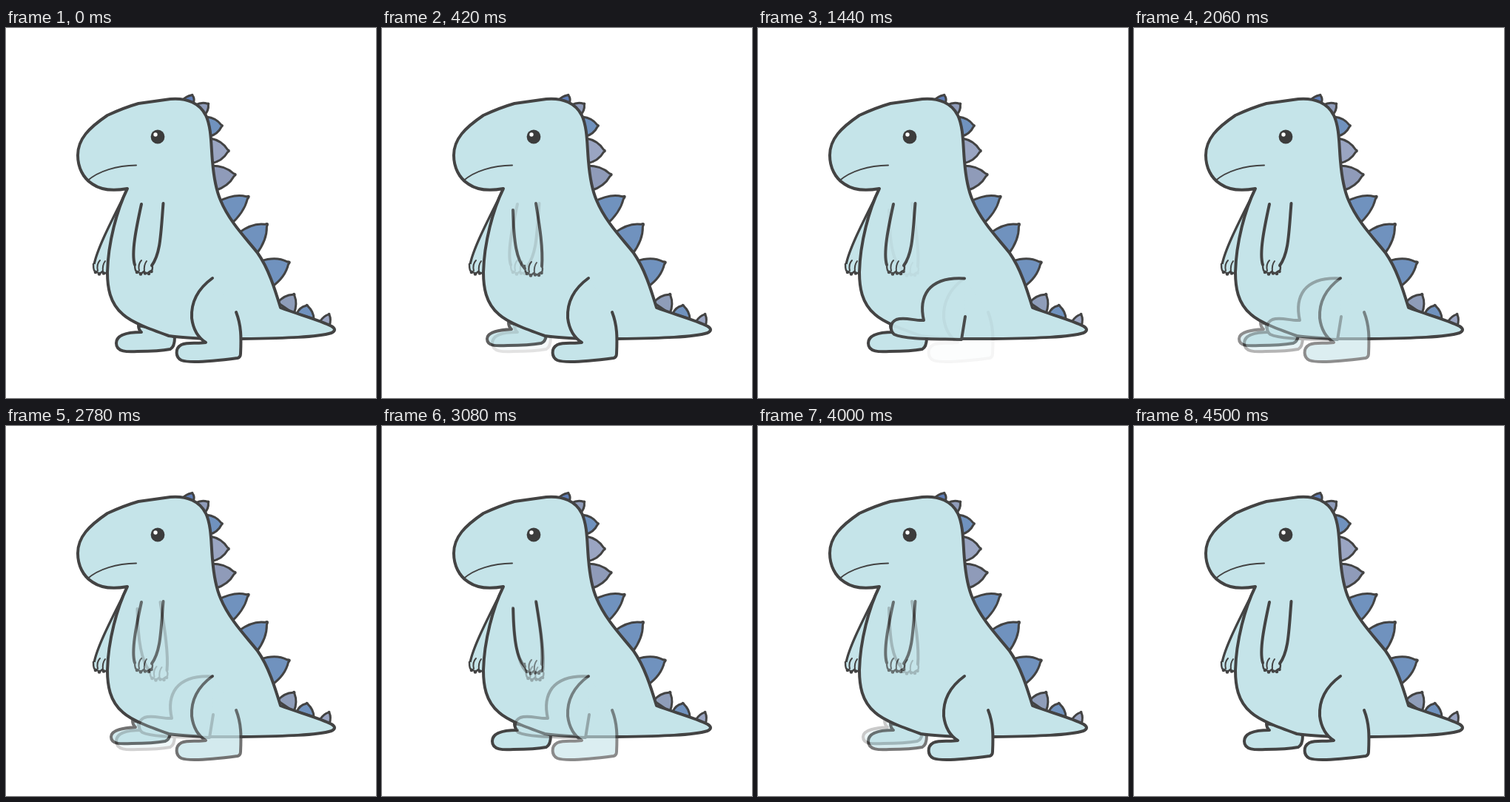
Animation of 500 by 500 pixels, one loop 4.62 s. Source, as an HTML page:

```html
<!DOCTYPE html>
<html>
<head>
<meta charset="utf-8">
<style>
  html, body { margin: 0; width: 100%; height: 100%; overflow: hidden; background: #fff; }
  svg { display: block; width: 100%; height: 100%; }
</style>
</head>
<body>
<svg id="stage" viewBox="0 0 500 500"><g id="from"></g><g id="to"></g></svg>
<script>
const LOOP = 4620, INK = '#434343', SKIN = '#c5e4e9';

const path = (d, width = 4, fill = 'none') =>
  `<path d="${d}" fill="${fill}" stroke="${INK}" stroke-width="${width}" stroke-linecap="round" stroke-linejoin="round"/>`;
const dot = (x, y, r, fill) => `<circle cx="${x}" cy="${y}" r="${r}" fill="${fill}"/>`;

// A back plate: two bulging sides that meet in a rounded tip
function spike([ax, ay, tx, ty, bx, by, fill]) {
  const cx = (ax + tx + bx) / 3, cy = (ay + ty + by) / 3;
  const bulge = (x, y) => {
    const mx = (x + tx) / 2, my = (y + ty) / 2;
    return `${mx + (mx - cx) * .65},${my + (my - cy) * .65}`;
  };
  const nearTip = (x, y) => `${tx + (x - tx) * .1},${ty + (y - ty) * .1}`;
  const peak = `${tx + (tx - cx) * .08},${ty + (ty - cy) * .08}`;
  return path(`M${ax},${ay}Q${bulge(ax, ay)} ${nearTip(ax, ay)}Q${peak} ${nearTip(bx, by)}Q${bulge(bx, by)} ${bx},${by}Z`, 3, fill);
}

function hand(dx, dy) {
  const claws = [[177, 330], [182, 332.5], [188, 331.5], [193, 332], [196.5, 329]];
  return `<g transform="translate(${dx} ${dy})">` +
    path('M174,319C174,326 175,330 178,329C181,332 184,332 186,329C188,332 192,332 194,329C198,329 199,324 197,320', 2.4, SKIN) +
    path('M183,314Q178,319 180,328M190,315Q186,320 187,329', 2) +
    claws.map(([x, y]) => dot(x, y, 2.3, INK)).join('') + '</g>';
}

const BLUE = '#7092be', MAUVE = '#9aa5c2';
const spikes = [
  [238, 98, 252, 90, 253, 102, '#5f7fb8'],
  [256, 104, 274, 102, 268, 118, '#8f9cba'],
  [271, 120, 293, 132, 274, 147, BLUE],
  [276, 149, 302, 166, 277, 183, MAUVE],
  [277, 186, 311, 198, 282, 220, '#8f9bb9'],
  [286, 235, 329, 227, 302, 267, BLUE],
  [314, 277, 354, 264, 338, 306, BLUE],
  [344, 315, 384, 316, 359, 350, BLUE],
  [367, 371, 390, 359, 389, 386, '#8f9db9'],
  [393, 386, 407, 374, 416, 393, BLUE],
  [424, 397, 437, 386, 437, 403, MAUVE]
].map(spike).join('');

const body = path(`M164,217C148,220 130,220 117,211C104,203 97,188 97,172C97,150 112,135 137,118
  C150,112 165,106 179,102L222,96C245,94 262,102 270,118C278,135 277,160 279,180
  C281,205 284,219 290,233C302,262 325,285 340,304C355,325 364,355 371,378
  C395,387 425,395 440,403Q448,408 440,412C420,418 380,419 318,420L270,420
  C250,419 232,418 220,416C195,407 170,398 158,387C140,372 137,350 137,330
  C138,290 150,245 164,217Z`, 4, SKIN);

const farArm = path('M163,220C144,258 123,298 119,320L137,330L154,238', 3.2, SKIN) + hand(-56, 0);

const face = dot(205, 147, 9.4, '#3c3c3c') + dot(202, 144, 2.7, '#fff') +
  path('M110,206.5C125,193 150,186 176,185.5', 2);

const arms = {
  A: hand(0, 0) + path('M183,238C176,270 169,304 174,320M212.5,237C209,280 209,304 197,321'),
  B: hand(19, 2) + path('M177,246C178,290 182,314 193,325M208,237C212,262 218,296 216,322'),
  C: hand(20.5, 11) + path('M177.5,247C178,290 183,318 194,331M208.5,238C213,266 220,306 217.5,330')
};

const legs = {
  down: path(`M279,338C257,354 250,374 251,392C253,408 259,418 270,425C258,427 246,424 237,428
    C228,433 229,445 237,449C250,454 290,449 313,446Q317,445 317,440C318,418 318,402 311,384`, 4, SKIN),
  up: path(`M279,338.5C255,337 240,342 230,354C221,366 221,382 224,395C212,396 198,390 187,394
    C178,398 178,409 184,414C198,421 240,420 275,421L280,390`, 4, SKIN)
};

const farLegs = {
  down: path(`M179,402Q179,408 183,411C168,411 149,413 149,426C149,438 164,438 178,437
    C194,437 212,436 222,434Q228,431 228,418L210,408Z`, 4, SKIN),
  up: path(`M171,398Q171,404 175,407C160,408 142,410 142,420C142,430 154,430 170,429
    C188,429 204,428 215,426Q221,424 222,415L204,406Z`, 4, SKIN)
};

// Three-step walk, with the arm swinging on its own pattern
const swing = 'ACBACABACBAABCABCAACBACA';
function scene(step) {
  const stride = step % 3;
  return '<rect width="500" height="500" fill="#fff"/>' +
    farLegs[stride == 2 ? 'up' : 'down'] + farArm + spikes + body +
    legs[stride == 1 ? 'up' : 'down'] + arms[swing[step % swing.length]] + face;
}

// [time, walk step]; fractions dissolve into the next pose
const pace = [[0, 0], [420, 2.15], [1440, 6.95], [2060, 10.6], [2780, 13.75], [3700, 18.75], [4500, 24], [LOOP, 24]];
function walkAt(t) {
  const i = pace.findIndex(([end]) => end > t);
  const [t0, p0] = pace[i - 1], [t1, p1] = pace[i];
  return p0 + (p1 - p0) * (t - t0) / (t1 - t0);
}

// The picture is held for about 102 ms, on a 20 ms grid
function hold(t) {
  if (t < 20) return 0;
  const tick = Math.floor((t - 20) / 20);
  const n = Math.min(44, Math.ceil((tick + .9) / 5.11) - 1);
  return 20 + 20 * Math.floor(5.11 * n + .1);
}

const from = document.getElementById('from'), to = document.getElementById('to');
let shown = -1;
function draw() {
  const t = hold(performance.now() % LOOP);
  if (t !== shown) {
    shown = t;
    const walk = walkAt(t), step = Math.floor(walk);
    from.innerHTML = scene(step);
    to.innerHTML = scene(step + 1);
    to.setAttribute('opacity', walk - step);
  }
  requestAnimationFrame(draw);
}
draw();
</script>
</body>
</html>
```
